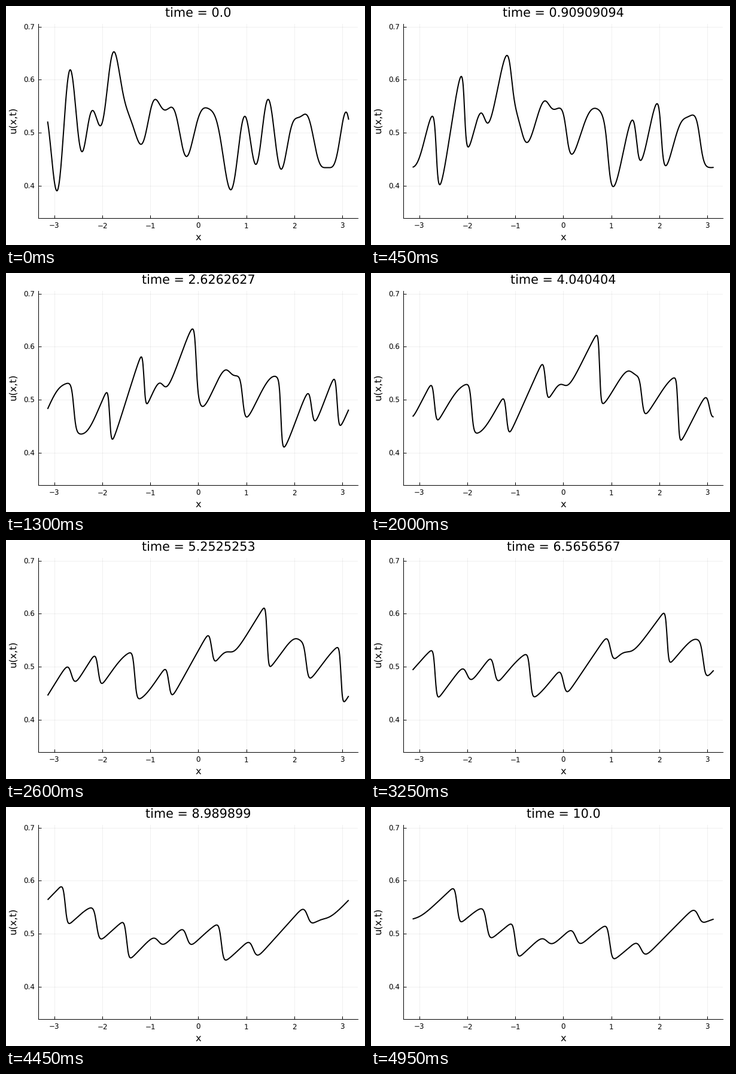
Recreate the animation shown at these times as a matplotlib script. Size 600 by 400 pixels, loop 5000 ms.

```python
import numpy as np
import matplotlib.pyplot as plt
from matplotlib.animation import FuncAnimation

W, H, DPI = 600, 400, 100
FRAMES, INTERVAL = 100, 50
T_END = 10.0
NU = 0.001          # viscosity
N = 1024            # grid points over one period
SUBSTEPS = 40       # solver steps per frame

plt.rcParams["font.family"] = "DejaVu Sans"
plt.rcParams["text.hinting"] = "none"

# Key points of the starting wave: peaks and troughs, then shoulders
TURNS = np.array([
    (-2.948, .390), (-2.670, .619), (-2.424, .464), (-2.205, .542),
    (-2.043, .513), (-1.760, .653), (-1.195, .478), (-0.895, .563),
    (-0.700, .543), (-0.558, .548), (-0.246, .455), (0.147, .547),
    (0.677, .392), (0.970, .531), (1.200, .440), (1.457, .563),
    (1.729, .431), (2.230, .535), (2.700, .434), (3.080, .539),
])
SHOULDERS = np.array([
    (-1.506, .550), (0.0, .528), (0.300, .539), (0.420, .508),
    (2.000, .524), (2.450, .468), (2.570, .4365), (2.830, .440),
])


def start_wave(x, modes=32, scale=0.16, slope_weight=1 / 30, ridge=0.003):
    """Smooth periodic curve through the key points, flat at every turn."""
    k = np.arange(modes + 1)
    w = np.exp(-(k * scale) ** 2 / 4)

    def basis(p):
        a = np.outer(p, k)
        return np.hstack([np.cos(a) * w, np.sin(a) * w])

    def slope(p):
        a = np.outer(p, k)
        return np.hstack([-np.sin(a) * k * w, np.cos(a) * k * w])

    pts = np.vstack([TURNS, SHOULDERS])
    m = np.vstack([basis(pts[:, 0]), slope(TURNS[:, 0]) * slope_weight])
    b = np.concatenate([pts[:, 1] - 0.5, np.zeros(len(TURNS))])
    coef = m.T @ np.linalg.solve(m @ m.T + ridge * np.eye(len(b)), b)
    return 0.5 + basis(x) @ coef


def solve_burgers(u):
    """u_t + u u_x = NU u_xx, spectral RK4 with an integrating factor."""
    k = np.arange(N // 2 + 1)
    dt = T_END / (FRAMES - 1) / SUBSTEPS
    half = np.exp(-NU * k ** 2 * dt / 2)
    full = half ** 2

    def flux(v):
        return -0.5j * k * np.fft.rfft(np.fft.irfft(v, N) ** 2)

    v = np.fft.rfft(u)
    waves = [u]
    for _ in range(FRAMES - 1):
        for _ in range(SUBSTEPS):
            a = flux(v)
            b = flux(half * (v + dt / 2 * a))
            c = flux(half * v + dt / 2 * b)
            d = flux(full * v + dt * half * c)
            v = full * v + dt / 6 * (full * a + 2 * half * (b + c) + d)
        waves.append(np.fft.irfft(v, N))
    return waves


def pt(px):
    return px * 72 / DPI


x = np.linspace(-np.pi, np.pi, N, endpoint=False)
waves = solve_burgers(start_wave(x))
times = np.linspace(0, T_END, FRAMES).astype(np.float32)

fig = plt.figure(figsize=(W / DPI, H / DPI), dpi=DPI, facecolor="white")

LEFT, RIGHT, TOP, BOTTOM = 54.45, 588.3, 30.07, 355.07
ax = fig.add_axes([LEFT / W, 1 - BOTTOM / H, (RIGHT - LEFT) / W, (BOTTOM - TOP) / H])
ax.set_xlim(-1.06 * np.pi, 1.06 * np.pi)
ax.set_ylim(0.33845, 0.70548)
xticks = range(-3, 4)
yticks = [0.4, 0.5, 0.6, 0.7]
ax.set_xticks(xticks)
ax.set_yticks(yticks)
ax.tick_params(direction="in", length=pt(5), width=pt(1),
               labelbottom=False, labelleft=False)
ax.grid(color="black", alpha=0.06, linewidth=pt(1))
ax.set_axisbelow(True)
ax.spines[["top", "right"]].set_visible(False)
ax.spines[["left", "bottom"]].set_linewidth(pt(1))


def label(px, py, text, size, **kw):
    kw = {"ha": "center", "va": "baseline", **kw}
    return fig.text(px / W, 1 - py / H, text, fontsize=pt(size), color="black", **kw)


def to_px(vx, vy):
    px, py = ax.transData.transform((vx, vy))
    return px, H - py


MID = (LEFT + RIGHT) / 2
for t in xticks:
    label(to_px(t, 0.5)[0], 371.5, str(t).replace("-", "\u2212"), 11.9)
for t in yticks:
    label(48, to_px(0, t)[1] + 4.8, f"{t:.1f}", 11.9, ha="right")
label(MID, 391.5, "x", 16.4)
label(16.7, 191, "u(x,t)", 16.4, rotation=90, rotation_mode="anchor")
title = label(MID, 18.3, "", 20.8)

line, = ax.plot(x, waves[0], color="black", linewidth=pt(2),
                solid_capstyle="butt", solid_joinstyle="round")


def draw(i):
    line.set_ydata(waves[i])
    title.set_text(f"time = {times[i]!s}")
    return line, title


anim = FuncAnimation(fig, draw, frames=FRAMES, interval=INTERVAL,
                     repeat=True, repeat_delay=0)
plt.show()
```
